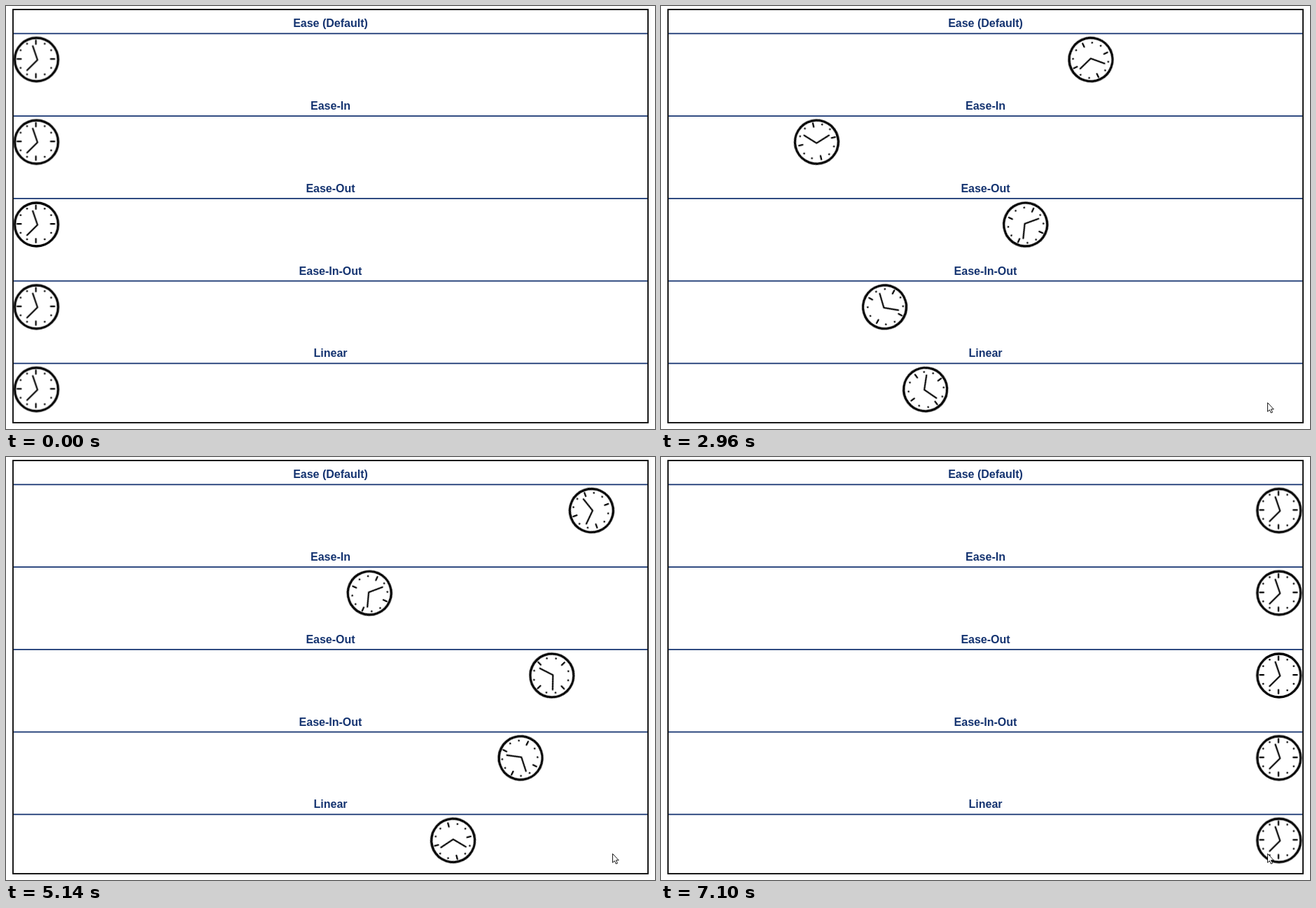
Animation of 927x604 px, one loop 8.47 s. Source, as an HTML page:

```html
<!DOCTYPE html>
<html lang="en">
<head>
<meta charset="utf-8">
<title>Timing functions</title>
<style>
  html, body { margin: 0; width: 100%; height: 100%; overflow: hidden; background: #fff; }
  svg { display: block; width: 927px; height: 604px; }
  text { font: bold 16px "Liberation Sans", Arial, sans-serif; fill: #143370; text-anchor: middle; }
  .rule { stroke: #143370; stroke-width: 1.7; }
  .frame { fill: none; stroke: #000; stroke-width: 1.8; }
  .ring { fill: #fff; stroke: #000; stroke-width: 3.4; }
  .mark { fill: none; stroke: #000; stroke-width: 2.2; stroke-linecap: round; stroke-linejoin: round; }
</style>
</head>
<body>
<svg viewBox="0 0 927 604">
  <defs>
    <g id="clock">
      <circle class="ring" r="31"/>
      <g id="dial" transform="translate(-.8 -.8)"/>
      <path class="mark" d="M-5.3-19.3 1.5.5-13.4 15.3"/>
    </g>
  </defs>
  <g id="rows"></g>
  <rect class="frame" x="10" y="5" width="907" height="590"/>
  <path id="cursor" fill="#fff" stroke="#000" stroke-width=".9"
        d="M.5.5V13.2L3.3 10.6 5.3 15 7.4 14.1 5.4 9.8H9.2Z"/>
</svg>
<script>
const LOOP = 8470;
const ROW_GAP = 117.75;
const START_X = 43.5, END_X = 882.7;
const ROWS = [
  ["Ease (Default)", "ease"],
  ["Ease-In", "ease-in"],
  ["Ease-Out", "ease-out"],
  ["Ease-In-Out", "ease-in-out"],
  ["Linear", "linear"],
];
// time in ms, progress, number of picture steps until the next entry
const TIMELINE = [
  [160, -0.0114, 14],
  [1020, 0.1132, 16],
  [1980, 0.2539, 16],
  [2960, 0.3981, 26],
  [4540, 0.6287, 19],
  [5710, 0.7986, 23],
  [7100, 1.003, 1],
  [LOOP, 1.003, 1],
];

const byId = id => document.getElementById(id);

function add(parent, tag, attrs, text = "") {
  const node = document.createElementNS("http://www.w3.org/2000/svg", tag);
  for (const name in attrs) node.setAttribute(name, attrs[name]);
  node.textContent = text;
  return parent.appendChild(node);
}

for (let hour = 0; hour < 12; hour++) {
  const transform = `rotate(${hour * 30})`;
  if (hour % 3) add(byId("dial"), "circle", { cy: -25.2, r: 1.3, transform });
  else add(byId("dial"), "path", { class: "mark", d: "M0-26.6V-21.2", transform });
}

const clocks = ROWS.map(([label, easing], i) => {
  const top = i * ROW_GAP;
  const y = 76.5 + top;
  add(byId("rows"), "text", { x: 463.5, y: 30.3 + top }, label);
  add(byId("rows"), "path", { class: "rule", d: `M11 ${39.4 + top}H916` });
  const clock = add(byId("rows"), "use", { href: "#clock" });
  const motion = clock.animate([
    { transform: `translate(${START_X}px, ${y}px) rotate(0deg)` },
    { transform: `translate(${END_X}px, ${y}px) rotate(360deg)` },
  ], { duration: 1000, easing, fill: "both" });
  motion.pause();
  return motion;
});

const cursor = byId("cursor").animate([
  { transform: "translate(927px, 604px)" },
  { transform: "translate(866px, 566px)" },
], { duration: 450, easing: "ease-out", fill: "both" });
cursor.pause();

// The picture advances in steps of about 60 ms
function stepAt(time) {
  const next = TIMELINE.findIndex(entry => entry[0] > time);
  if (next < 1) return { time: 0, progress: 0 };
  const [t0, p0, steps] = TIMELINE[next - 1];
  const [t1, p1] = TIMELINE[next];
  const part = Math.floor((time - t0) / (t1 - t0) * steps + 0.02) / steps;
  return {
    time: t0 + (t1 - t0) * part,
    progress: Math.min(1, Math.max(0, p0 + (p1 - p0) * part)),
  };
}

const begin = performance.now();
function draw() {
  const step = stepAt((performance.now() - begin) % LOOP);
  for (const clock of clocks) clock.currentTime = step.progress * 1000;
  cursor.currentTime = Math.max(0, step.time - 160);
  requestAnimationFrame(draw);
}
draw();
</script>
</body>
</html>
```
